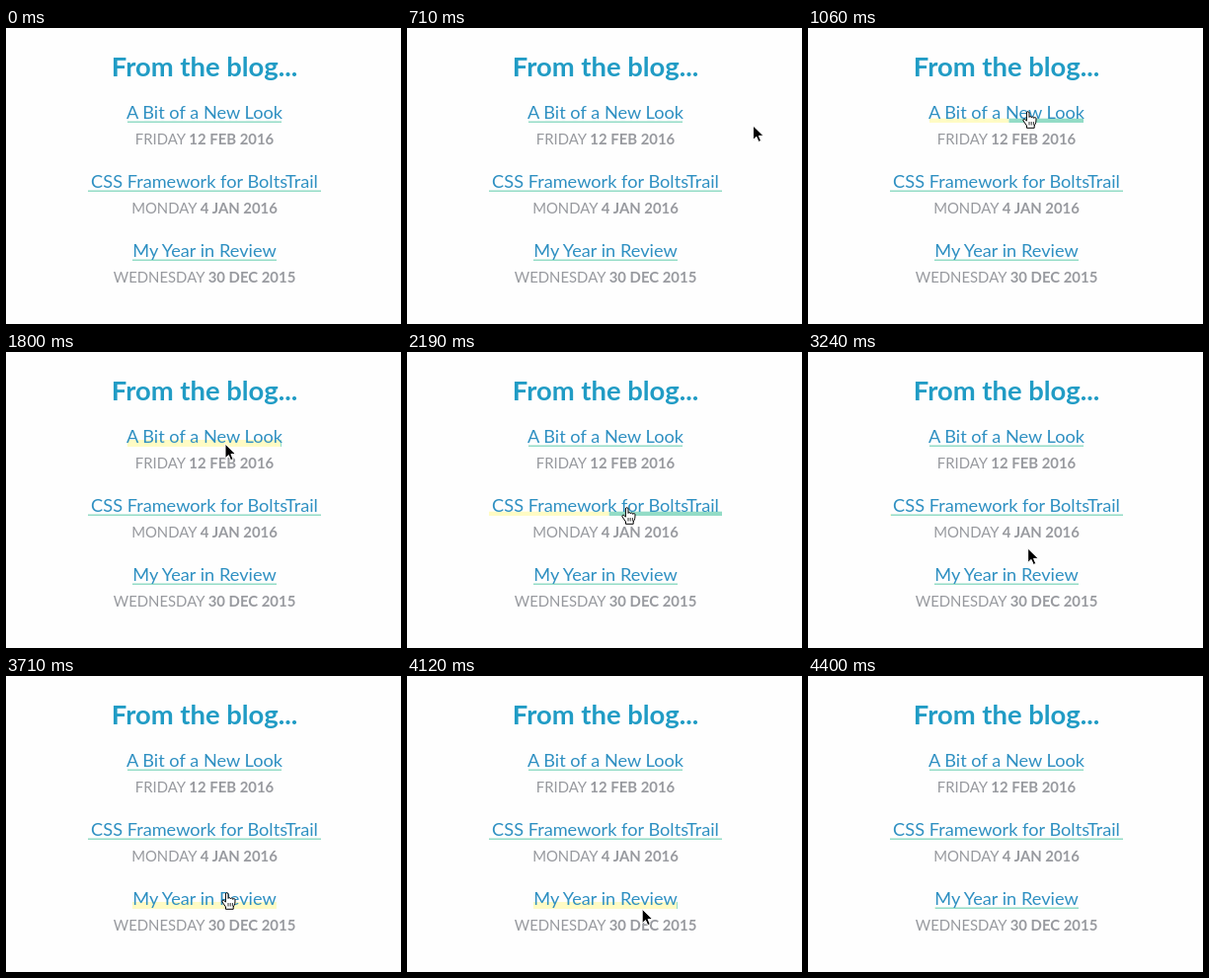
Recreate the animation shown at these times as an HTML page. Size 400 by 300 pixels, loop 4.64 s.

```html
<!DOCTYPE html>
<html lang="en">
<head>
<meta charset="utf-8">
<title>Blog links</title>
<style>
  html, body { margin: 0; width: 100%; height: 100%; overflow: hidden; background: #fefefe; }
  svg { display: block; }
  text { font-family: Lato, "Open Sans", sans-serif; text-anchor: middle; }
  .title { font-size: 27.4px; font-weight: 700; fill: #219cc5; }
  .link { font-size: 18.2px; fill: #2f90c2; }
  .date { font-size: 14.9px; fill: #989a9f; }
  .date tspan { font-weight: 700; }
</style>
</head>
<body>
<svg width="400" height="300" viewBox="0 0 400 300">
  <text class="title" x="201" y="49">From the blog...</text>
  <g id="posts"></g>
  <g id="pointer">
    <path id="arrow" d="M0 0V14.5L3.4 11.4 5.6 16.5 8.1 15.4 5.9 10.4H10.6Z" stroke="#fff"/>
    <g id="hand" transform="translate(-5)" fill="#fff" stroke="#000" stroke-linejoin="round">
      <path d="M4.4 10.2L3.2 8.8C2.2 7.6 .2 8.4 1 10L4.5 15V17.3H12.2V15C13.8 12.5 14 11 14 7.8 14 6.2 12 6.2 11.8 7.4 11.6 5.8 9.6 5.6 9.4 6.8 9.2 5.4 7.2 5.2 7 6.4V2C7 .2 4.4 .2 4.4 2Z"/>
      <path d="M7 11v3.5m2.2-3.5v3.5m2.2-3.5v3.5" stroke-width=".8"/>
    </g>
  </g>
</svg>
<script>
const LOOP = 4640, FADE = 300;

// Each post is also a place where the pointer rests, from arrive to leave
const posts = [
  { title: "A Bit of a New Look", day: "FRIDAY", date: "12 FEB 2016",
    width: 156, x: 222, y: 84, arrive: 1060, leave: 1690 },
  { title: "CSS Framework for BoltsTrail", day: "MONDAY", date: "4 JAN 2016",
    width: 236, x: 222, y: 157, arrive: 2190, leave: 2850 },
  { title: "My Year in Review", day: "WEDNESDAY", date: "30 DEC 2015",
    width: 146, x: 223, y: 219, arrive: 3480, leave: 4010 }
];
const entry = { x: 394, y: 104, leave: 540 };
const exit = { x: 300, y: 306, arrive: 4400 };
const stops = [entry, ...posts, exit];

const $ = id => document.getElementById(id);
const clamp = p => Math.min(1, Math.max(0, p));
const easeOut = p => 1 - (1 - clamp(p)) ** 2;
const smooth = p => (p = clamp(p), p * p * (3 - 2 * p));
const mix = (a, b, p) => a + (b - a) * p;

$("posts").innerHTML = posts.map((post, i) => `
  <g transform="translate(201 ${92 + i * 70})">
    <rect fill="#93dcc6"/><rect fill="#fffbc4"/>
    <text class="link">${post.title}</text>
    <text class="date" y="26">${post.day} <tspan>${post.date}</tspan></text>
  </g>`).join("");

posts.forEach((post, i) => {
  post.bars = $("posts").children[i].querySelectorAll("rect");
  // The pointer is over the link shortly before and after its rest
  post.enter = post.arrive - 90;
  post.out = post.leave + 110;
});

function setBar(bar, x, width, height) {
  Object.entries({ x, y: 4 - height, width, height })
    .forEach(([name, value]) => bar.setAttribute(name, value));
}

function drawUnderline({ width, enter, out, bars }, t) {
  const p = easeOut((t - enter) / FADE) - easeOut((t - out) / FADE);
  const height = mix(1.5, 7, p), left = -width / 2;
  setBar(bars[0], left + width * p, width * (1 - p), height);
  setBar(bars[1], left, width * p, height);
}

function drawPointer(t) {
  const shown = t >= entry.leave && t < exit.arrive;
  $("pointer").style.display = shown ? "" : "none";
  if (!shown) return;
  const i = stops.findIndex(stop => stop.arrive > t);
  const from = stops[i - 1], to = stops[i];
  const p = smooth((t - from.leave) / (to.arrive - from.leave));
  $("pointer").setAttribute("transform",
    `translate(${mix(from.x, to.x, p)} ${mix(from.y, to.y, p)})`);
  const hovering = posts.some(post => t >= post.enter && t <= post.out);
  $("hand").style.display = hovering ? "" : "none";
  $("arrow").style.display = hovering ? "none" : "";
}

const begin = performance.now();
function tick() {
  const t = (performance.now() - begin) % LOOP;
  posts.forEach(post => drawUnderline(post, t));
  drawPointer(t);
  requestAnimationFrame(tick);
}
tick();
</script>
</body>
</html>
```
